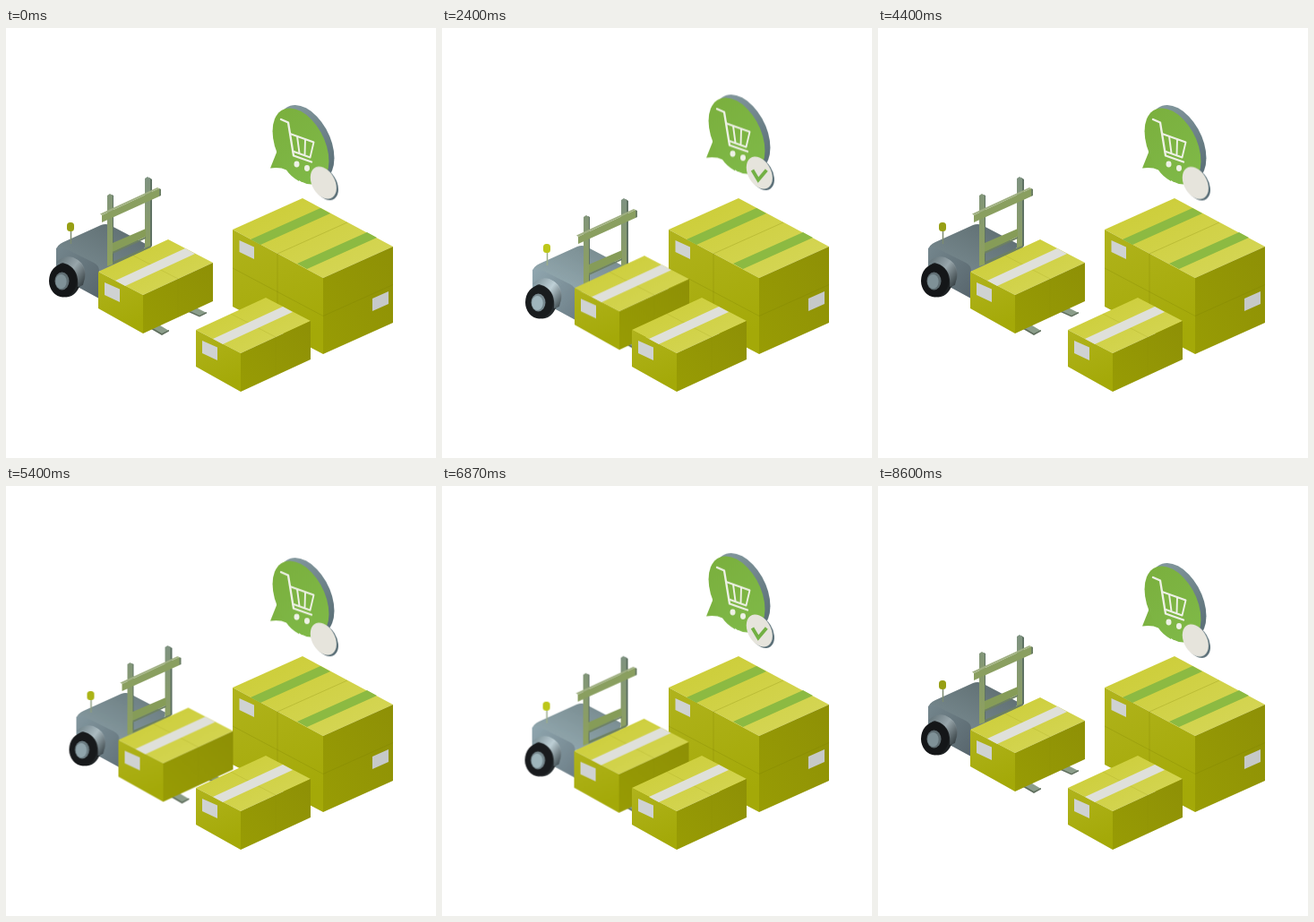
Recreate the animation shown at these times as an HTML page. Size 480 px wide and 480 px high, loop 8.67 s.

```html
<!DOCTYPE html>
<html lang="en">
<head>
<meta charset="utf-8">
<title>Warehouse delivery</title>
<style>
  html, body { margin: 0; width: 100%; height: 100%; overflow: hidden; background: #fff; }
  svg { display: block; width: 100vw; height: 100vh; }

  .drive, .lift, .truck, .tick { animation: 4335ms cubic-bezier(.333, 0, .667, 1) infinite; }
  .drive { animation-name: drive; }
  .lift { animation-name: lift; }
  .truck { animation-name: light; }
  .tick { animation-name: tick; stroke-dasharray: 100 120; }
  .bob { animation: bob 4335ms cubic-bezier(.364, 0, .636, 1) infinite; }
  .coin { animation-delay: -3974ms; }

  @keyframes drive {
    0%, 4.2% { transform: translate(0, 0); }
    23.1%, 33.4% { transform: translate(22.5px, 12px); }
    51.9%, 57% { transform: translate(45px, 24px); }
    81.2%, 100% { transform: translate(0, 0); }
  }
  @keyframes light {
    0%, 4.2% { filter: brightness(1); }
    23.1%, 33.4% { filter: brightness(1.13); }
    51.9%, 57% { filter: brightness(1.25); }
    81.2%, 100% { filter: brightness(1); }
  }
  @keyframes lift {
    0%, 24% { transform: translateY(0); }
    30.2%, 51.2% { transform: translateY(-20px); }
    57.7%, 100% { transform: translateY(0); }
  }
  @keyframes bob {
    0%, 100% { transform: translateY(0); }
    50% { transform: translateY(-12px); }
  }
  @keyframes tick {
    0%, 26% { stroke-dashoffset: 101; animation-timing-function: ease-out; }
    39%, 62.3% { stroke-dashoffset: 0; animation-timing-function: linear; }
    75%, 100% { stroke-dashoffset: -101; }
  }
</style>
</head>
<body>
<svg viewBox="0 0 480 480">
  <defs>
    <linearGradient id="top" x1="0" y1="0" x2="1" y2="1">
      <stop stop-color="#cbcc34"/><stop offset="1" stop-color="#d6d75a"/>
    </linearGradient>
    <linearGradient id="left" x1="0" y1="0" x2=".3" y2="1">
      <stop stop-color="#b0b31c"/><stop offset="1" stop-color="#a4a908"/>
    </linearGradient>
    <linearGradient id="right" x1="0" y1="1" x2="1" y2="0">
      <stop stop-color="#989c04"/><stop offset="1" stop-color="#8e9006"/>
    </linearGradient>
    <linearGradient id="hood" x1="0" y1="1" x2="1" y2="0">
      <stop stop-color="#7b8d93"/><stop offset="1" stop-color="#5c6b6e"/>
    </linearGradient>
    <linearGradient id="side" x1="0" y1="0" x2="1" y2="1">
      <stop stop-color="#74868d"/><stop offset="1" stop-color="#57656c"/>
    </linearGradient>
    <linearGradient id="fender" x1="0" y1="0" x2="1" y2=".8">
      <stop stop-color="#5d6d73"/><stop offset=".55" stop-color="#98a6ab"/><stop offset="1" stop-color="#3d474b"/>
    </linearGradient>
    <linearGradient id="steel" x1="0" y1="0" x2="0" y2="1">
      <stop stop-color="#7f9381"/><stop offset="1" stop-color="#8fa25a"/>
    </linearGradient>
    <linearGradient id="leaf" x1="0" y1="0" x2="1" y2="1">
      <stop stop-color="#7aae3c"/><stop offset="1" stop-color="#80bb4a"/>
    </linearGradient>
    <linearGradient id="rim" x1="0" y1="0" x2="1" y2="1">
      <stop stop-color="#8ba0a5"/><stop offset="1" stop-color="#52666f"/>
    </linearGradient>

    <g id="parcel">
      <path fill="url(#top)" d="M212 337 290 301 340 327 262 363z"/>
      <path fill="url(#left)" d="M212 337 262 363V406L212 378z"/>
      <path fill="url(#right)" d="M262 363 340 327V370L262 406z"/>
      <path fill="none" stroke="#8a8c10" stroke-opacity=".25" stroke-width=".7" d="M251 319 301 345V388"/>
      <path fill="#dfe0da" d="M231 347 309 311 320 317 242 353z"/>
      <path fill="#cfd2d2" d="M219 349 236 356.500V371L219 363z"/>
    </g>
  </defs>

  <!-- stacked boxes -->
  <path fill="url(#top)" d="M253 225 331 190 432 244 354 279z"/>
  <path fill="url(#left)" d="M253 225 354 279V364L253 311z"/>
  <path fill="url(#right)" d="M354 279 432 244V329L354 364z"/>
  <path fill="none" stroke="#777900" stroke-opacity=".3" stroke-width=".8"
        d="M381 217 303 252V337M253 268 354 321.500 432 286.500"/>
  <path fill="#8cba42" d="M273 236 351 201 362 207 284 242zM325 263 403 228 414 234 336 269z"/>
  <path fill="#cfd2d2" d="M260.500 237 277 244.500V258L260.500 250z"/>
  <path fill="#c6c9c9" d="M409 302 427 294V308L409 316z"/>

  <!-- forklift -->
  <g class="drive">
    <g class="truck">
      <path fill="url(#hood)" d="M56 248Q57 242 64 239L106 220Q111 218 116 220L156 241 150 262 103 272 76 258z"/>
      <path fill="url(#side)" d="M56 246Q58 243 64 245L98 262Q104 265 104 271V302L56 276z"/>
      <path fill="none" stroke="#7c8b70" stroke-width="1.500" d="M72.500 226V241"/>
      <rect x="68" y="217" width="8" height="10" rx="3.500" fill="#979f14"/>
      <ellipse cx="73" cy="275" rx="15.500" ry="18" fill="url(#fender)"/>
      <ellipse cx="67" cy="281" rx="16" ry="19.500" fill="#1d2123"/>
      <ellipse cx="63.500" cy="282" rx="15.500" ry="18.500" fill="#141618"/>
      <path fill="url(#fender)" d="M56 262Q64 253 75 256 88 262 88 277L86 287 80 289Q82 271 69 264 62 261 56 262z"/>
      <ellipse cx="62.500" cy="282.500" rx="8" ry="10" fill="#5f6d72"/>
      <ellipse cx="61.500" cy="283" rx="6.200" ry="8" fill="#7f9197"/>
    </g>
    <g>
      <path fill="#5f7263" d="M118 186 120 187V260L118 264zM160 167 163 169V243L160 247z"/>
      <path fill="url(#steel)" d="M113 187 116 185 119 187V264L113 266zM155 168 158 166 161 168V246L155 248z"/>
      <path fill="#869c58" d="M119 240 156 224V233L119 250z"/>
      <path fill="#6d8062" d="M119 250 156 233V235L119 252zM119 261 161 243V246L119 264z"/>
      <path fill="#8a9f60" d="M107 209 171 179V188L107 217z"/>
      <path fill="#a0b082" d="M107 209 105 207.500 169 178 171 179z"/>
      <path fill="#6c7f64" d="M171 179 173 180V187L171 188z"/>
    </g>
    <g class="lift">
      <path fill="#8b9d8a" d="M150 327 162 326 182 338 174 342zM190 309 202 307 224 318 216 322z"/>
      <path fill="#5e6d5c" d="M150 327 174 341 182 337V338.500L174 343 150 329zM190 309 216 321 224 317V318.500L216 322.500 190 311z"/>
      <use href="#parcel" x="-109" y="-65"/>
    </g>
  </g>

  <use href="#parcel"/>

  <!-- order bubble -->
  <g class="bob">
    <circle r="37" transform="matrix(.85 .45 0 1.060 335 128.500)" fill="url(#rim)"/>
    <path fill="url(#leaf)" d="M298 120Q303 134 302 139L295 156.500Q306 155 313 158.500 318 166 327 171L337 140z"/>
    <circle r="37" transform="matrix(.85 .45 0 1.060 329 132)" fill="url(#leaf)"/>
    <g fill="none" stroke="#eef1e6" stroke-width="2.300" stroke-linejoin="round" stroke-linecap="round">
      <path d="M307 102 315 105.500 321 142.500 341 149.500"/>
      <path stroke-width="1.900" d="M317 118 343.500 127.500 339.500 144.500 320 137.500M325 121 327.500 139.500M334 124.500 333.500 142"/>
    </g>
    <g fill="#eef1e6">
      <ellipse cx="324.500" cy="152" rx="3" ry="3.400"/>
      <ellipse cx="336" cy="156.500" rx="3" ry="3.400"/>
    </g>
  </g>
  <g class="bob coin">
    <circle r="16" transform="matrix(.91 .37 0 1.060 356.500 175)" fill="url(#rim)"/>
    <circle r="16" transform="matrix(.91 .37 0 1.060 354.300 173.500)" fill="#e6e4dc"/>
    <path class="tick" pathLength="100" fill="none" stroke="#72b043" stroke-width="3.800"
          d="M346.500 170.500 353 181.500 362.300 170.500"/>
  </g>
</svg>
</body>
</html>
```
